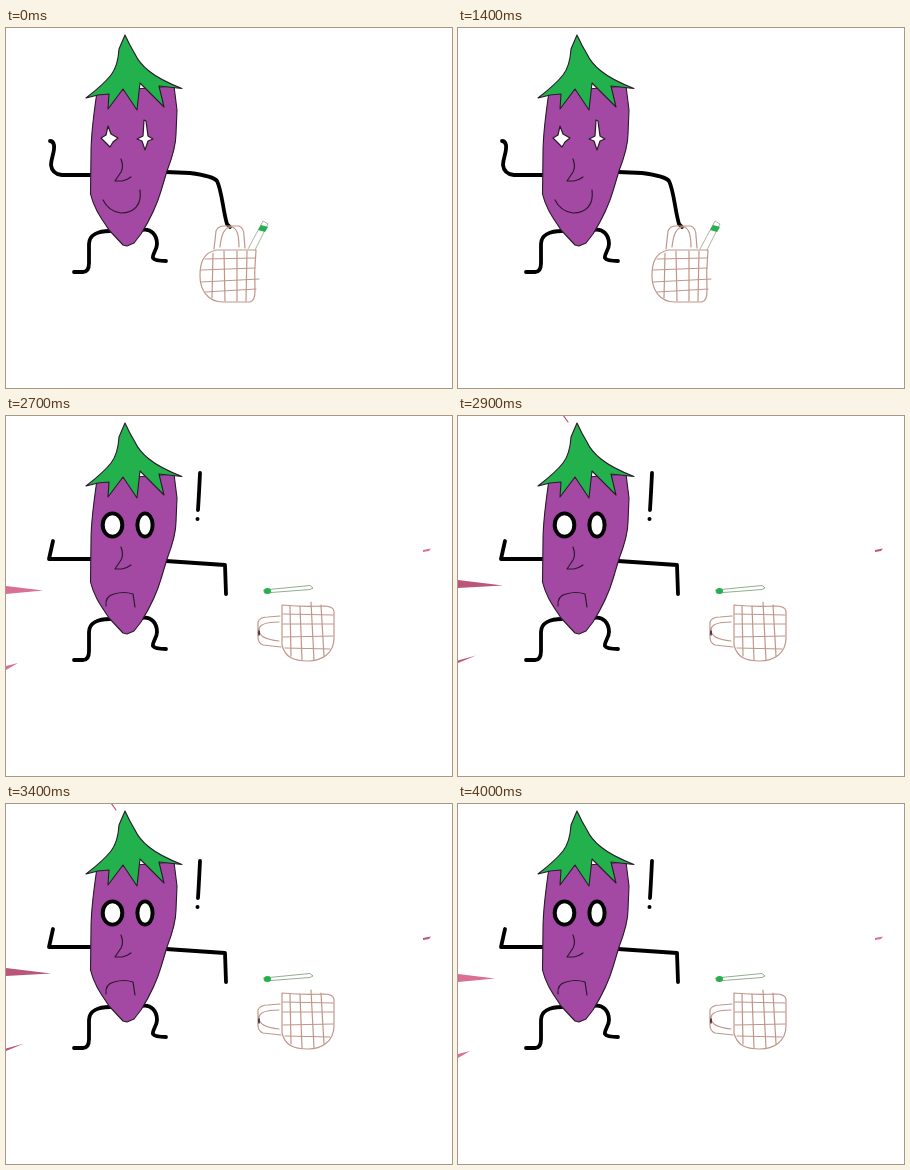
Animation, 446 px wide and 360 px high, one loop 4.2 s. Source, as an HTML page with a canvas:

```html
<!DOCTYPE html>
<html lang="en">
<head>
<meta charset="utf-8">
<title>Eggplant with a basket</title>
<style>
html, body { margin: 0; width: 100%; height: 100%; overflow: hidden; background: #fff; }
canvas { display: block; }
</style>
</head>
<body>
<canvas id="stage" width="446" height="360"></canvas>
<script>
const ctx = document.getElementById('stage').getContext('2d');
const LOOP = 4200;
const INK = '#000', THIN = '#2a1a2a', WICKER = '#c0968a';
const GREEN = '#22b14c', PURPLE = '#a349a4';

ctx.lineCap = ctx.lineJoin = 'round';

function stroke(d, color = INK, width = 3.8) {
  ctx.strokeStyle = color;
  ctx.lineWidth = width;
  ctx.stroke(new Path2D(d));
}

function shape(d, fill, color = THIN, width = 1.1) {
  ctx.fillStyle = fill;
  ctx.fill(new Path2D(d));
  if (color) stroke(d, color, width);
}

function dot(x, y, rx, ry = rx, fill = INK) {
  ctx.beginPath();
  ctx.ellipse(x, y, rx, ry, 0, 0, Math.PI * 2);
  ctx.fillStyle = fill;
  ctx.fill();
}

function body() {
  stroke('M104 203C92 203 83 207 83 216V235Q83 244 77 244H68');
  stroke('M136 202C145 200 151 207 151 216C151 222 146 226 147 230Q149 233 160 233');
  shape('M91 64C88 84 85 105 85 125L84.5 166C88 181 96 191 103 202L117 217L121 218L128 215' +
    'L135 206C143 193 151 177 155 163L161 143C166 130 170 118 170 106L171 82L168 58Z', PURPLE);
  shape('M119 7L113 21Q112 38 105 47Q98 56 80 70L92 67L103 66L102 81L117 61L131 82' +
    'L134 55L158 79L153 58L176 60.5Q154 52 143 43Q133 35 129 26Q124 18 119 7Z', GREEN);
  stroke('M115 131Q118 139 115 144L109 153L116 153Q121 152 125 149', THIN, 1.2);
}

function happyFace() {
  shape('M102 98L105 106L112 110L107 114L104 119L100 115L95 110L100 107Z', '#fff', THIN, 1.2);
  shape('M138 92L140 93L142 108L147 111L142 113L139 122L136 113L131 111L137 108Z', '#fff', THIN, 1.2);
  stroke('M97 172C101 180 107 184 115 185C128 185 136 177 134 162', THIN, 1.2);
}

function shockedFace() {
  for (const [x, rx] of [[106.5, 9.8], [139, 7.6]]) {
    dot(x, 109, rx + 2, 13.4);
    dot(x, 109, rx - 2, 9.8, '#fff');
  }
  stroke('M100 190Q99 180 108 178Q118 175 127 178L129 191', THIN, 1.2);
}

// Local origin is the top of the handle; angle is in degrees.
function basket(x, y, angle, withLeek) {
  ctx.save();
  ctx.translate(x, y);
  ctx.rotate(angle * Math.PI / 180);
  stroke('M-14 24H26Q24 45 25 65Q25 75 20 76H-7C-23 76 -30 63 -30 50C-30 35 -26 27 -14 24', WICKER, 1.2);
  stroke('M-16 23L-14 5Q-12 0 -6 0H9Q14 2 14 10L15 22M-10 21Q-8 1 1 1Q9 1 9 21', WICKER, 1.2);
  stroke('M-25 33L25 32M-29 44L25 42M-29 56L29 53M-25 66L26 63', WICKER, 1.2);
  stroke('M-17 27L-18 72M-6 25L-5 75M7 25V75M17 25L16 75', WICKER, 1.2);
  if (withLeek) {
    stroke('M18 23L33 -5L38 -2L25 24', '#a5b9a4', 1);
    shape('M31 -1L38 1L35 6L28 4Z', GREEN, null);
  }
  ctx.restore();
}

function standing() {
  stroke('M84 147H56Q46 146 45 137C45 130 49 124 48 117Q47 113 44 113');
  stroke('M160 144L184 145Q207 148 211 153C216 163 217 183 221 196L224 199');
  basket(224, 198, 0, true);
  body();
  happyFace();
}

function swinging() {
  stroke('M169 113Q177 107 190 103Q212 94 232 81');
  dot(232, 81, 3);
  stroke('M160 145L202 147Q220 150 230 147');
  basket(230, 147, -92, true);
  stroke('M179 196Q203 189 222 174M202 215Q216 202 246 185M236 218Q248 206 272 194', '#87566a', 1.1);
  body();
  happyFace();
}

const mix = (a, b, k) => a + (b - a) * k;

// k moves the edge spikes from the pale set (0) to the dark set (1).
function spikes(k) {
  const tone = `rgb(${mix(217, 158, k)},${mix(112, 58, k)},${mix(145, 98, k)})`;
  const y = mix(174, 162, k);
  shape(`M0 ${y - 4}L${mix(37, 53, k)} ${mix(174.5, 164.5, k)}L0 ${y + 4}Z`, tone, null);
  const thick = mix(4, 0.8, k);
  const tipY = mix(247, 232, k);
  shape(`M0 ${mix(250, 239, k)}L${mix(12, 24, k)} ${tipY}L0 ${mix(250, 239, k) + thick}Z`, tone, null);
  if (k < 1) shape('M417 134L425 132.5L423 135L417 136Z', tone, null);
  if (k > 0) stroke('M105 -1L110 6', tone, 1.2);
}

function shocked(k) {
  spikes(k);
  stroke('M84 143H43L47 125');
  stroke('M160 145L219 149L220 178');
  stroke('M194 57Q193 78 192 94');
  dot(191.5, 103, 2);
  basket(252, 215, -90, false);
  dot(253, 217, 1, 3, '#4a3038');
  shape('M258 174L304 169.5L307 172L304 173.5L259 177Z', '#fff', '#94ad91', 1);
  dot(261.5, 175, 3.5, 3, GREEN);
  body();
  shockedFace();
}

function render(t) {
  ctx.fillStyle = '#fff';
  ctx.fillRect(0, 0, 446, 360);
  if (t < 2700) {
    Math.floor(t / 700) % 2 ? swinging() : standing();
    return;
  }
  const step = t < 2900 ? 0 : Math.min(12, 1 + Math.floor((t - 2900) / 100));
  shocked([0, 0.5, 0, 0.5, 1][step % 5]);
}

const start = performance.now();
function tick(now) {
  render(Math.max(0, now - start) % LOOP);
  requestAnimationFrame(tick);
}
render(0);
requestAnimationFrame(tick);
</script>
</body>
</html>
```
